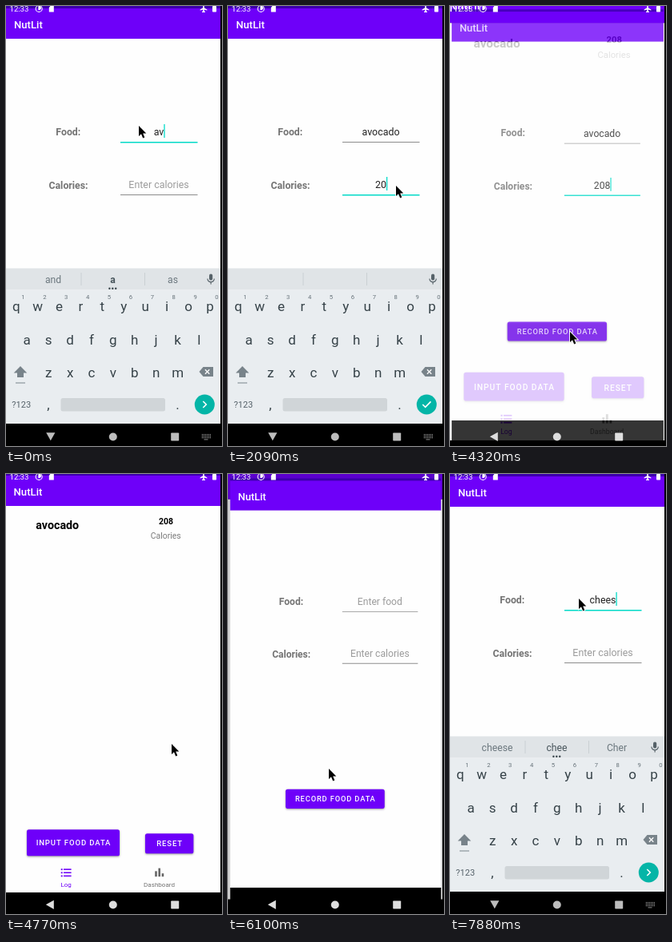
Recreate the animation shown at these times as an HTML page with a canvas. Size 270 by 551 pixels, loop 8 s.

```html
<!DOCTYPE html>
<html lang="en">
<head>
<meta charset="utf-8">
<title>NutLit</title>
<style>
html, body { margin: 0; width: 100%; height: 100%; overflow: hidden; background: #000; }
canvas { display: block; width: 270px; height: 551px; }
</style>
</head>
<body>
<canvas id="stage"></canvas>
<script>
const W = 270, H = 551, LOOP = 8000, SCREEN = 269;
const PURPLE = '#6e00f9', DARK = '#3d00ac', TEAL = '#03dac8', GREY = '#747474', KEY = '#364248', ICON = '#78838a';
const canvas = document.getElementById('stage'), g = canvas.getContext('2d');
const dpr = window.devicePixelRatio || 1;
canvas.width = W * dpr;
canvas.height = H * dpr;

// Timelines: [start, value]
const FOOD = [[0, 'av'], [290, 'avo'], [440, 'avoc'], [590, 'avoca'], [740, 'avocad'], [890, 'avocado'],
  [5000, ''], [7420, 'c'], [7570, 'ch'], [7650, 'che'], [7720, 'chee'], [7870, 'chees']];
const CALORIES = [[0, ''], [1780, '2'], [2080, '20'], [2230, '208'], [5000, '']];
const FOCUS = [[0, 'food'], [1400, 'cal'], [5000, ''], [7060, 'food']];
const HINTS = [[0, 'and,a,as'], [140, 'average,av,avoid'], [430, 'avoid,avo,avocado'], [580, 'avocado,avoc,avocados'],
  [730, 'avocado,avoca,avocados'], [880, 'avocado,avocad,avocados'], [1030, 'avocado,avocado,avocados'],
  [1330, ''], [7500, 'can,c,could'], [7640, 'chat,ch,the'], [7720, 'check,che,the'], [7870, 'cheese,chee,Cher']];
const MOUSE = [[0, 166, 150], [900, 166, 150], [1180, 210, 225], [2380, 210, 225], [2980, 54, 532], [3140, 54, 532],
  [3265, 167, 512], [3600, 150, 408], [4330, 150, 408], [4700, 207, 338], [4850, 207, 338], [5250, 95, 458],
  [5700, 95, 458], [6100, 126, 369], [6800, 161, 156], [8000, 161, 156]];

const clamp = v => Math.max(0, Math.min(1, v));
const span = (t, a, b) => clamp((t - a) / (b - a));
const easeOut = p => 1 - (1 - p) ** 3;
const smooth = p => p * p * (3 - 2 * p);
const current = (list, t) => list.filter(e => e[0] <= t).pop();

function rect(x, y, w, h, color, r = 0) {
  g.fillStyle = color;
  g.beginPath();
  g.roundRect(x, y, w, h, r);
  g.fill();
}

function disc(x, y, r, color) {
  g.fillStyle = color;
  g.beginPath();
  g.arc(x, y, r, 0, 7);
  g.fill();
}

function shape(d, x, y, color, line) {
  const p = new Path2D(d);
  g.save();
  g.translate(x, y);
  if (line) {
    g.strokeStyle = color;
    g.lineWidth = line;
    g.stroke(p);
  } else {
    g.fillStyle = color;
    g.fill(p);
  }
  g.restore();
}

// y is the middle of the capitals
function text(s, x, y, size, color, weight = 400, align = 'center', spacing = 0) {
  g.font = `${weight} ${size}px Roboto, sans-serif`;
  g.letterSpacing = spacing + 'px';
  g.textAlign = align;
  g.fillStyle = color;
  g.fillText(s, x + (align === 'center' ? spacing / 2 : 0), y + size * 0.36);
}

function button(label, x, y, w, h, press) {
  g.save();
  g.shadowColor = 'rgba(0,0,0,.4)';
  g.shadowBlur = 2.5 * dpr;
  g.shadowOffsetY = dpr;
  rect(x, y, w, h, PURPLE, 2.6);
  g.restore();
  if (press > 0) rect(x, y, w, h, `rgba(255,255,255,${0.24 * press})`, 2.6);
  text(label, x + w / 2, y + h / 2 + 0.3, 9.5, '#fff', 500, 'center', 0.87);
}

const pressed = (t, a, b) => span(t, a, a + 100) * (1 - span(t, b, b + 200));

function frameWindow(scale, alpha, content) {
  g.save();
  g.translate(134.5, 275);
  g.scale(scale, scale);
  g.translate(-134.5, -275);
  g.globalAlpha = alpha;
  rect(0, 0, SCREEN, 3, DARK);
  rect(0, 3, SCREEN, 38, PURPLE);
  rect(0, 41, SCREEN, 482, '#fefefe');
  rect(0, 523, SCREEN, 28, '#000');
  text('NutLit', 10, 23, 13.1, '#fff', 500, 'left');
  content();
  g.restore();
}

function field(value, hint, y, focused, blink) {
  text(value || hint, 191, y + 0.3, 12.4, value ? '#222' : '#9b9b9b');
  const half = value ? g.measureText(value).width / 2 : 0;
  rect(143, y + 13, 96.5, focused ? 1.4 : 0.9, focused ? TEAL : '#8c8c8c');
  if (focused && blink) rect(191 + half, y - 9, 1.3, 17, TEAL);
}

function form(t) {
  const food = current(FOOD, t), cal = current(CALORIES, t), focus = current(FOCUS, t);
  const last = Math.max(food[0], cal[0], focus[0]);
  const blink = (t - last) % 1000 < 500;
  text('Food:', 77.8, 157.2, 12.3, GREY, 700);
  text('Calories:', 78, 224.5, 12.3, GREY, 700);
  field(food[1], 'Enter food', 157, focus[1] === 'food', blink);
  field(cal[1], 'Enter calories', 223, focus[1] === 'cal', blink);
  button('RECORD FOOD DATA', 70.7, 397.3, 126.3, 24.6, pressed(t, 4020, 4200));
}

function log(t) {
  text('avocado', 64.5, 64.5, 14.2, '#000', 700);
  text('208', 199.7, 59.8, 10.4, '#000', 700);
  text('Calories', 199.5, 77.6, 10.4, '#7a7a7a');
  button('INPUT FOOD DATA', 26.4, 444.5, 115.6, 33, pressed(t, 5400, 5650));
  button('RESET', 173.8, 449.5, 60.2, 25, 0);
  for (let i = 0; i < 3; i++) {
    rect(69, 493.4 + i * 4.1, 1.9, 1.9, PURPLE);
    rect(72.2, 493.5 + i * 4.1, 9.6, 1.6, PURPLE);
    rect(186 + i * 4.2, [496.5, 492.8, 499.3][i], 2.6, [6.8, 10.5, 4][i], '#666');
  }
  text('Log', 75.4, 513, 8, PURPLE);
  text('Dashboard', 191.3, 513, 8, GREY);
}

function keyRow(letters, x, y) {
  [...letters].forEach((c, i) => text(c, x + i * 26.9, y, 17, KEY));
}

function keyboard(t) {
  const shown = t < 4000 ? 1 - span(t, 3135, 3280) : easeOut(span(t, 7180, 7400));
  if (!shown) return;
  g.save();
  g.globalAlpha = shown;
  g.translate(0, (1 - shown) * 158);
  rect(0, 328.5, SCREEN, 27, '#e0e4e7');
  rect(0, 355.5, SCREEN, 168, '#e9edf0');
  rect(93.6, 334, 0.8, 16, '#c5cbcf');
  rect(173, 334, 0.8, 16, '#c5cbcf');
  const words = current(HINTS, t)[1];
  if (words) {
    words.split(',').forEach((w, i) =>
      text(w, [59, 133.5, 208.5][i], 343, 12.2, i === 1 ? '#47545b' : '#6b777e', w === 'a' ? 700 : 400));
    for (let i = -1; i < 2; i++) disc(133.3 + i * 3.9, 353.8, 1.2, KEY);
  }
  rect(254, 335.5, 4.2, 8, '#566269', 2.1);
  shape('M-4.2 0A4.2 4.2 0 0 0 4.2 0M0 4.2V7', 256.1, 341.5, '#566269', 1.2);

  keyRow('qwertyuiop', 12.8, 376.3);
  for (let i = 0; i < 10; i++) text((i + 1) % 10, 21.4 + i * 26.9, 364.6, 7.7, '#67737a');
  keyRow('asdfghjkl', 26.2, 417.7);
  keyRow('zxcvbnm', 53.2, 458.5);
  shape('M0 -8L8.3 .5H4V6H-4V.5H-8.3ZM-6 12.4H6V13.5H-6Z', 18, 459, ICON);
  shape('M-9 0L-4 -6H8.5V6H-4Z', 250.5, 458, ICON);
  shape('M-1.6 -2.7L3.8 2.7M3.8 -2.7L-1.6 2.7', 250.5, 458, '#fff', 1.3);
  text('?123', 19.2, 499, 11, '#56626a');
  text(',', 53, 499, 17, KEY);
  text('.', 214.5, 499, 17, KEY);
  rect(68.5, 491, 130.5, 16.5, '#d0d5d8', 2.5);
  disc(248.3, 499, 12.5, '#04b5a7');
  const numeric = t >= 1480 && t < 5000;
  shape(numeric ? 'M-5 0L-1.6 3.4L5.2 -3.6' : 'M-2 -4L2 0L-2 4', 248.3, 499, '#fff', 1.6);
  g.restore();
}

function navBar(t) {
  const ime = t < 3500 || t > 7080;
  const color = ime ? '#bdbdbd' : '#dedede';
  if (ime) rect(0, 523, SCREEN, 28, '#000');
  const grow = easeOut(span(t, 3080, 3250)), fade = 1 - span(t, 3350, 3650);
  if (grow && fade) {
    const w = 67 * grow, h = 34 * grow;
    g.save();
    g.beginPath();
    g.rect(0, 523, SCREEN, 28);
    g.clip();
    rect(56.5 - w / 2, 540 - h / 2, w, h, `rgba(255,255,255,${0.2 * fade})`, h / 2);
    g.restore();
  }
  const down = t < 3400 || t > 7200;
  shape(down ? 'M-5.6 -5H5.6L0 5Z' : 'M4 -5.6V5.6L-6 0Z', 55.8, 539.3, color);
  disc(133.8, 539.5, 5, color);
  rect(206.2, 534.5, 10, 10, color, 0.8);
  if (t < 3200 || t > 7080) {
    for (let r = 0; r < 3; r++)
      for (let i = 0; i < 6; i++) rect(244.8 + i * 2, 536 + r * 2, 1.2, 1.2, '#8f8f8f');
    rect(247.5, 542.4, 5, 1, '#8f8f8f');
  }
}

function statusBar() {
  text('12:33', 4.5, 4, 9.6, '#fff', 400, 'left');
  shape('M4 0A4 4 0 1 1 -4 0A4 4 0 1 1 4 0', 41.2, 3.4, '#fff', 1.1);
  shape('M-.8 -3.6H1A2.8 2.8 0 0 1 1 1.6H-.8Z', 41.2, 3.4, '#fff');
  shape('M-3 -1.5L-1 -4H3V4H-3Z', 56.8, 3.5, '#fff');
  shape('M-.8 -4H.8V-1L4.4 1.2V2.3L.8 1.2V3L2 4V4.7H-2V4L-.8 3V1.2L-4.4 2.3V1.2L-.8 -1Z', 247, 3.2, '#fff');
  rect(258, 0, 5, 7.6, '#fff', 0.8);
}

function pointer(t) {
  const i = MOUSE.findIndex(m => m[0] > t);
  const a = MOUSE[i - 1], b = MOUSE[i], p = smooth(span(t, a[0], b[0]));
  const x = a[1] + (b[1] - a[1]) * p, y = a[2] + (b[2] - a[2]) * p;
  const arrow = 'M0 0V13L3 10.2L5.2 15.4L7.3 14.4L5.2 9.5H9.3Z';
  shape(arrow, x, y, '#fff', 1.8);
  shape(arrow, x, y, '#000');
}

function draw(t) {
  g.setTransform(dpr, 0, 0, dpr, 0, 0);
  rect(0, 0, W, H, '#000');
  g.save();
  g.beginPath();
  g.rect(0, 0, 268, H);
  g.clip();

  const closing = easeOut(span(t, 4280, 5020)), opening = easeOut(span(t, 5800, 6420));
  if (t > 4280 && t < 6420) {
    frameWindow(1 + 0.1 * (1 - closing) + 0.046 * opening, 1, () => log(t));
    if (opening) rect(0, 0, SCREEN, H, `rgba(0,0,0,${0.2 * opening})`);
  }
  if (t < 4440) frameWindow(1 - 0.1 * closing, 1 - span(t, 4290, 4440), () => form(t));
  else if (t > 5800) frameWindow(0.85 + 0.15 * opening, span(t, 5830, 5940), () => form(t));

  keyboard(t);
  navBar(t);
  statusBar();
  pointer(t);
  g.restore();
}

const start = performance.now();
function tick() {
  draw((performance.now() - start) % LOOP);
  requestAnimationFrame(tick);
}
tick();
</script>
</body>
</html>
```
